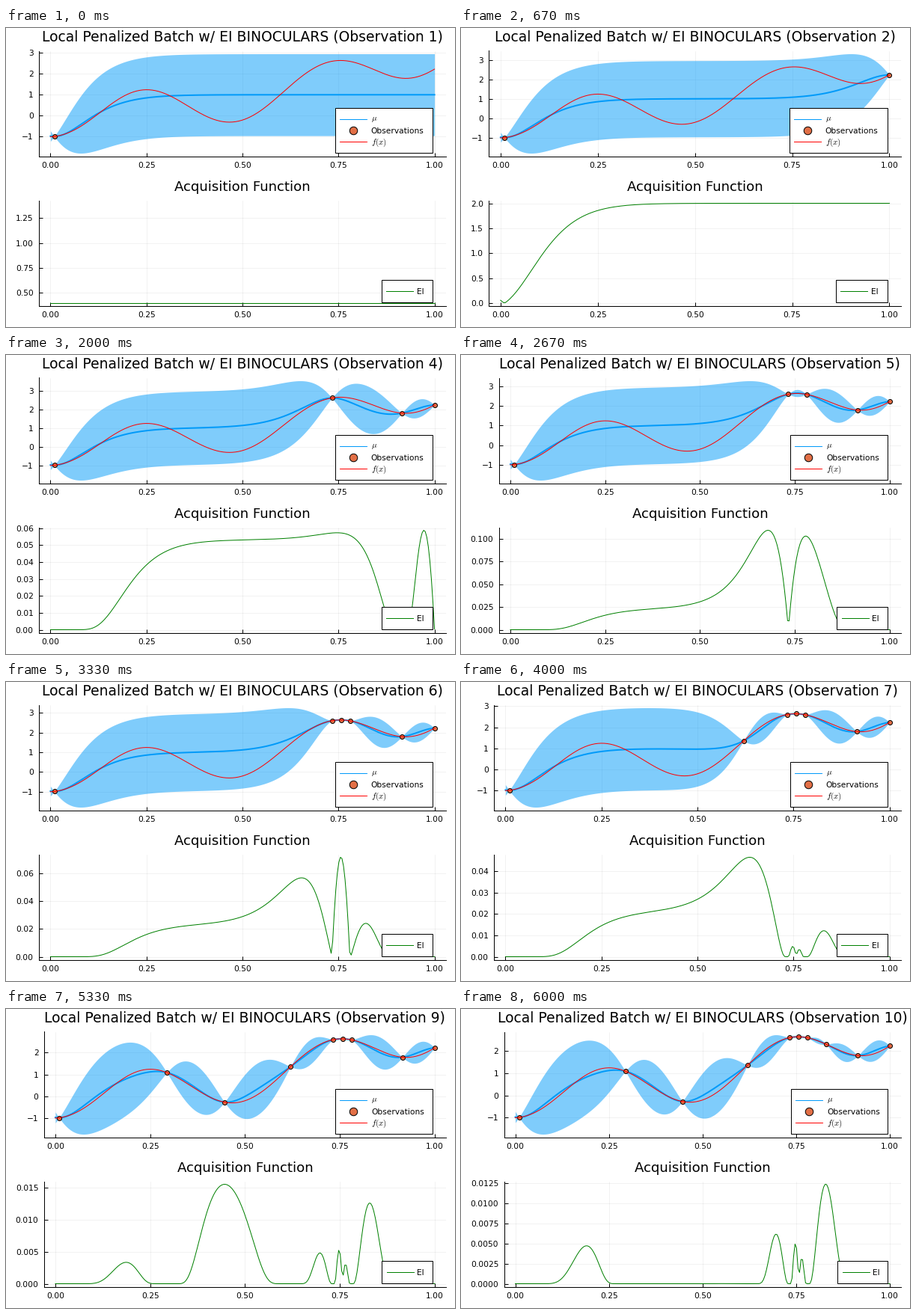
These frames come from a looping animation (600 by 400 pixels, 6.67 s). A matplotlib script:

```python
import math
import numpy as np
import matplotlib.pyplot as plt
from matplotlib.animation import FuncAnimation
from matplotlib.patches import Rectangle

W, H, DPI = 600, 400, 100
PX = 72 / DPI
RIGHT, HEIGHT = 588, 141
FRAMES, INTERVAL = 58, 115
BLUE, RED, GREEN, ORANGE = "#009af9", "#ff0000", "#008000", "#e26f46"
plt.rcParams.update({"font.family": "DejaVu Sans", "mathtext.fontset": "cm"})

GRID = np.linspace(0, 1, 250)
SAMPLES = np.array([0.01, 1, 0.915, 0.733, 0.7805, 0.757, 0.62, 0.294, 0.446, 0.83])

# Key points of the smooth objective: turning points and a few between them
KEYS = np.array([
    (0, -1.01), (0.1, -0.25), (0.18, 0.82), (0.25, 1.24), (0.36, 0.44),
    (0.467, -0.31), (0.54, 0.15), (0.62, 1.355), (0.755, 2.64), (0.83, 2.3),
    (0.93, 1.785), (1, 2.226)])


def gauss(a, b):
    return 4 * np.exp(-0.5 * ((a[:, None] - b) / 0.15) ** 2)


def matern(a, b):
    s = math.sqrt(5) * np.abs(a[:, None] - b) / 0.1
    return (1 + s + s * s / 3) * np.exp(-s)


def objective(x):
    kx, ky = KEYS.T
    gram = gauss(kx, kx) + 2e-5 * np.eye(len(kx))
    return 1 + gauss(x, kx) @ np.linalg.solve(gram, ky - 1)


def posterior(xs, ys):
    if not len(xs):
        return np.ones_like(GRID), np.ones_like(GRID)
    cross = matern(GRID, xs)
    gram = matern(xs, xs) + 1e-6 * np.eye(len(xs))
    mean = 1 + cross @ np.linalg.solve(gram, ys - 1)
    var = 1 - np.sum(cross * np.linalg.solve(gram, cross.T).T, axis=1)
    return mean, np.sqrt(np.maximum(var, 1e-12))


def improvement(xs, ys):
    mean, std = posterior(xs, ys)
    best = ys.max() if len(ys) else 1
    z = (mean - best) / std
    pdf = np.exp(-z * z / 2) / math.sqrt(2 * math.pi)
    cdf = np.array([0.5 * math.erfc(-v / math.sqrt(2)) for v in z])
    return std * (pdf + z * cdf)


def tick_step(span):
    """Largest round step that fits about three times, and its decimals."""
    limit = span / 3.02
    unit = 10.0 ** math.floor(math.log10(limit))
    step = max(m * unit for m in (1, 2, 2.5, 5) if m * unit <= limit)
    digits = next(d for d in range(9) if abs(step * 10 ** d % 1 - 0.5) > 0.4999)
    return step, digits


TRUTH = objective(GRID)
VALUES = objective(SAMPLES)

fig = plt.figure(figsize=(W / DPI, H / DPI), dpi=DPI, facecolor="white")
top, low, over = (fig.add_axes([0, 0, 1, 1], label=n) for n in ("top", "low", "over"))
shown = None


def label(x, y, s, size=10.67, ha="left"):
    over.text(x, y, s, fontsize=size * PX, ha=ha, va="baseline", color="black")


def panel(ax, left, y0, lo, hi):
    """Place one plot with its grid, ticks and tick labels."""
    step, digits = tick_step(hi - lo)
    pad = 0.03 * (hi - lo)
    lo, hi = lo - pad, hi + pad
    width = RIGHT - left
    ax.cla()
    ax.set_position([left / W, 1 - (y0 + HEIGHT) / H, width / W, HEIGHT / H])
    ax.patch.set_visible(False)
    ax.set_axisbelow(True)
    xt = np.arange(5) / 4
    yt = np.arange(math.ceil(lo / step), math.floor(hi / step) + 1) * step
    ax.set_xticks(xt)
    ax.set_yticks(yt)
    ax.set(xlim=(-0.03, 1.03), ylim=(lo, hi))
    ax.grid(color="black", alpha=0.1, lw=0.5 * PX)
    ax.tick_params(direction="in", length=5 * PX, width=PX,
                   labelbottom=False, labelleft=False)
    ax.spines[["top", "right"]].set_visible(False)
    ax.spines[["left", "bottom"]].set_linewidth(PX)
    for t in xt:
        label(left + (t + 0.03) / 1.06 * width, y0 + HEIGHT + 15.5, f"{t:.2f}", ha="center")
    for t in yt:
        y = y0 + HEIGHT * (hi - t) / (hi - lo)
        label(left - 7.3, y + 4, f"{t:.{digits}f}".replace("-", "\u2212"), ha="right")


def box(x, y, bottom):
    over.add_patch(Rectangle((x, y), 570 - x, bottom - y, fc="white", ec="black", lw=PX))


def key(x, y, color):
    over.plot([x, x + 36], [y, y], color=color, lw=PX)


def dots(ax, x, y, size):
    ax.plot(x, y, "o", ms=size * PX, mfc=ORANGE, mec="black", mew=PX)


def legends(dx):
    box(439.5 + dx, 106.5, 166.5)
    key(445.5 + dx, 121.5, BLUE)
    dots(over, 463.5 + dx, 136.5, 10.5)
    key(445.5 + dx, 151.5, RED)
    label(487.5 + dx, 123.5, r"$\mu$", 11)
    label(487 + dx, 141, "Observations")
    label(487.5 + dx, 155.5, r"$f(x)$", 11)
    box(501.5 + dx, 336.5, 366.5)
    key(508 + dx, 351.5, GREEN)
    label(548.5 + dx, 356, "EI")


def compose(n):
    """Show the state after n observations; EI still lacks the newest one."""
    over.cla()
    over.set(xlim=(0, W), ylim=(H, 0))
    over.axis("off")
    xs, ys = SAMPLES[:n], VALUES[:n]
    mean, std = posterior(xs, ys)
    upper, lower = mean + 1.96 * std, mean - 1.96 * std
    ei = improvement(xs[:-1], ys[:-1])
    base, peak = ei.min(), ei.max()
    if peak - base < 1e-9:
        peak = base + 1
    left = 44 + 6.75 * (tick_step(peak - base)[1] - 2)
    mid = (left + RIGHT) / 2

    panel(top, left, 30.5, lower.min(), upper.max())
    top.fill_between(GRID, lower, upper, color=BLUE, alpha=0.5, lw=0)
    top.plot(GRID, mean, color=BLUE, lw=2 * PX)
    dots(top, xs, ys, 6)
    top.plot(GRID, TRUTH, color=RED, lw=PX)

    panel(low, left, 230.5, base, peak)
    low.plot(GRID, ei, color=GREEN, lw=PX)

    label(mid, 18, f"Local Penalized Batch w/ EI BINOCULARS (Observation {n})",
          18.75, "center")
    label(mid, 218, "Acquisition Function", 18.1, "center")
    legends(0.14 * (left - 44))


def draw(i):
    global shown
    n = min(10, 1 + (i + 1) * 10 // FRAMES)
    if n != shown:
        compose(n)
        shown = n
    return []


def reset():
    global shown
    shown = None
    return draw(0)


anim = FuncAnimation(fig, draw, frames=FRAMES, interval=INTERVAL, init_func=reset,
                     repeat=True, repeat_delay=0, blit=False)
plt.show()
```
